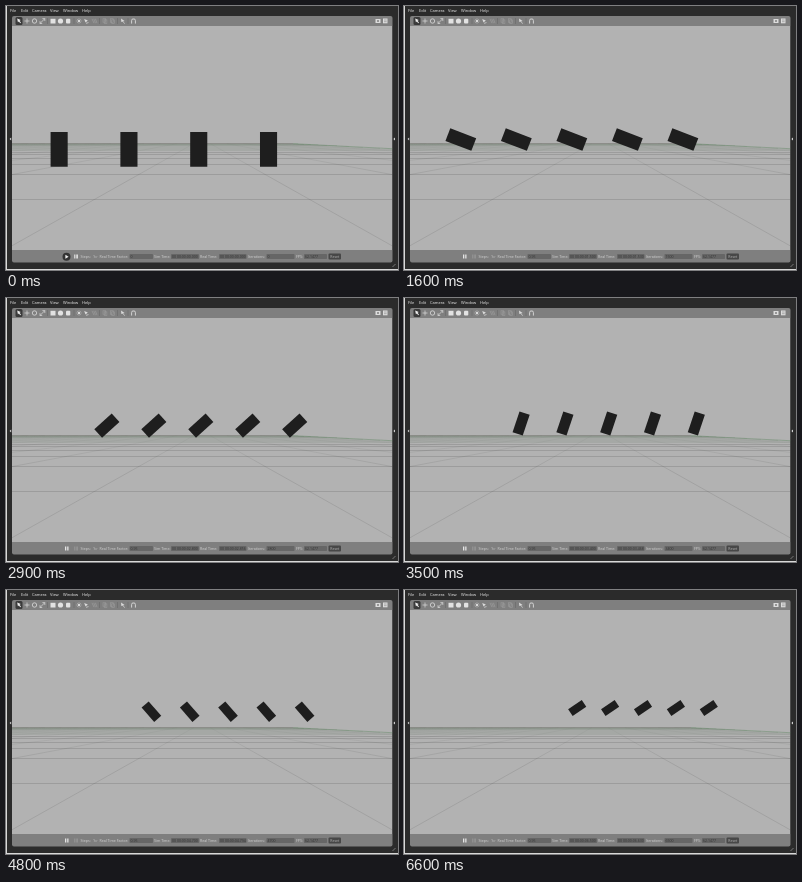
Animation, 392 px wide and 264 px high, one loop 6.7 s. Source, as an HTML page with a canvas:

```html
<!DOCTYPE html>
<html lang="en">
<head>
<meta charset="utf-8">
<title>Tumbling boxes</title>
<style>
html, body { margin: 0; width: 100%; height: 100%; overflow: hidden; background: #2b2b2b; }
canvas { display: block; width: 392px; height: 264px; }
</style>
</head>
<body>
<canvas id="stage" width="392" height="264"></canvas>
<script>
const ctx = document.getElementById('stage').getContext('2d');
const LOOP = 6700, STEP = 100;
const VIEW = { x: 6, y: 20, w: 380.5, h: 224 };
const VP = { x: 196, y: 133 };
const BAR = '#7f7f7f';

// seconds, inverse spacing of the row, angle of the long side in degrees
const KEYS = [
  [0, 1 / 69.8, 90], [0.13, 1 / 69.8, 90], [0.9, 1 / 61.5, 55], [2.3, 1 / 50.6, -13],
  [3.5, 1 / 43.8, -71.5], [4.8, 1 / 38.3, -131], [5.8, 1 / 35, -178], [6.6, 1 / 32.9, -214]
];

function rect(x, y, w, h, color, radius = 0) {
  ctx.fillStyle = color;
  ctx.beginPath();
  ctx.roundRect(x, y, w, h, radius);
  ctx.fill();
}

function path(points, color, width = 0.7, fill = false) {
  ctx.beginPath();
  points.forEach(([x, y], i) => i ? ctx.lineTo(x, y) : ctx.moveTo(x, y));
  if (fill) {
    ctx.fillStyle = color;
    ctx.fill();
  } else {
    ctx.strokeStyle = color;
    ctx.lineWidth = width;
    ctx.stroke();
  }
}

function disc(x, y, r, color, hollow = false) {
  ctx.beginPath();
  ctx.arc(x, y, r, 0, Math.PI * 2);
  ctx.fillStyle = ctx.strokeStyle = color;
  ctx.lineWidth = 0.8;
  hollow ? ctx.stroke() : ctx.fill();
}

function text(s, x, y, size, color) {
  ctx.font = size + 'px "Open Sans", "Noto Sans", sans-serif';
  ctx.fillStyle = color;
  ctx.fillText(s, x, y);
}

function pose(t) {
  let i = 1;
  while (i < KEYS.length - 1 && t > KEYS[i][0]) i++;
  const a = KEYS[i - 1], b = KEYS[i], u = (t - a[0]) / (b[0] - a[0]);
  return { gap: 1 / (a[1] + (b[1] - a[1]) * u), angle: (a[2] + (b[2] - a[2]) * u) * Math.PI / 180 };
}

function menu() {
  [['File', 4], ['Edit', 15], ['Camera', 26], ['View', 44], ['Window', 57], ['Help', 76]]
    .forEach(([s, x]) => text(s, x, 5.8, 4, '#f2f2f2'));
}

function toolbar() {
  const light = '#dcdcdc', dim = '#9c9c9c';
  rect(6, 10, 380.5, 10, BAR, [2, 2, 0, 0]);
  rect(9.5, 11, 7, 8, '#3a3a3a', 1.5);
  path([[11.2, 12.4], [14.8, 14], [13.6, 14.8], [15, 16.8], [14.2, 17.3], [12.9, 15.4], [11.9, 16.2]], '#eee', 0, true);
  path([[18.5, 15], [23.5, 15]], light);
  path([[21, 12.5], [21, 17.5]], light);
  disc(28.5, 15, 2.2, light, true);
  path([[34, 17.5], [38.8, 12.6]], light);
  path([[36.4, 12.6], [38.8, 12.6], [38.8, 15]], light);
  path([[34, 15.2], [34, 17.5], [36.2, 17.5]], light);
  rect(44.5, 12.8, 5, 4.7, '#e2e2e2');
  disc(54.5, 15, 2.6, '#e2e2e2');
  rect(60, 12.8, 4.3, 4.7, '#e2e2e2', 1);
  disc(73, 15, 1.2, light);
  for (let i = 0; i < 8; i++) {
    const a = i * Math.PI / 4, c = Math.cos(a), s = Math.sin(a);
    path([[73 + 1.6 * c, 15 + 1.6 * s], [73 + 2.6 * c, 15 + 2.6 * s]], light, 0.5);
  }
  path([[78.2, 13], [81.8, 14.5], [79.5, 16.5]], light, 0, true);
  path([[80, 17.3], [82.5, 16.6]], light);
  for (let i = 0; i < 3; i++) path([[86 + i * 1.7, 12.8], [88 + i * 1.5, 17.2]], dim);
  [41.5, 68, 93.5, 111.5, 122].forEach(x => path([[x, 12], [x, 18]], '#686868', 0.6));
  [97, 104.5].forEach(x => {
    ctx.strokeStyle = dim;
    ctx.lineWidth = 0.6;
    ctx.strokeRect(x, 12.8, 2.7, 3.4);
    ctx.strokeRect(x + 1.2, 13.9, 2.7, 3.4);
  });
  path([[115, 12.6], [118.6, 15], [115.4, 16]], light, 0, true);
  path([[117, 15.5], [118.6, 17.7]], light);
  path([[125.6, 17.6], [125.6, 14.6], [126.3, 13], [128.7, 13], [129.4, 14.6], [129.4, 17.6]], light, 0.9);
  rect(369.5, 13, 5, 4, light);
  disc(372, 15, 1, BAR);
  rect(377, 12.5, 4.5, 4.8, light);
  path([[378, 14], [380.7, 14]], '#777', 0.5);
  path([[378, 15.7], [380.7, 15.7]], '#777', 0.5);
}

function ground() {
  const cell = 3.56, left = -14.5, right = 5.5, rows = 18;
  const depth = n => 1 / (0.0164 + 0.0117 * n);
  const xAt = (k, dy) => VP.x + k * cell * dy;
  const far = depth(rows - 1), near = VIEW.y + VIEW.h - VP.y;

  for (let n = 0; n < rows; n++) {
    const dy = depth(n), y = Math.floor(VP.y + dy) + 0.5;
    const color = n > 5 ? 'rgba(50,80,55,.1)' : 'rgba(50,50,50,.17)';
    path([[Math.max(6, xAt(left, dy)), y], [Math.min(387, xAt(right, dy)), y]], color, 1);
  }

  // spokes thin out where they crowd together
  const fade = ctx.createLinearGradient(0, VP.y + far, 0, VP.y + 40);
  fade.addColorStop(0, 'rgba(50,60,50,.06)');
  fade.addColorStop(1, 'rgba(50,50,50,.22)');
  for (let k = left; k <= right; k++) {
    path([[xAt(k, far), VP.y + far], [xAt(k, near), VP.y + near]], fade, 0.6);
  }
  path([[6, 137.5], [xAt(right, far), 137.5]], 'rgba(80,65,65,.18)', 1);
  path([[xAt(right, far), VP.y + far], [xAt(right, 10), VP.y + 10]], 'rgba(70,125,75,.45)', 0.7);
}

function boxes(t) {
  const { gap, angle } = pose(t);
  const long = gap * 0.5, short = gap * 0.245;
  const lastX = 342.5 - 1.1456 * gap, y = 95.4 + 0.687 * gap;
  for (let i = 0; i < 5; i++) {
    ctx.save();
    ctx.translate(lastX - i * gap, y);
    ctx.rotate(angle);
    rect(-long / 2, -short / 2, long, short, '#1e1e1e');
    ctx.restore();
  }
}

function clock(s) {
  return '00 00:00:' + s.toFixed(3).padStart(6, '0');
}

function status(t) {
  const paused = t < 0.1, run = Math.max(0, t - 0.1), icon = '#e4e4e4';
  const label = (s, x) => text(s, x, 252, 3.6, '#d6d6d6');
  const field = (s, x, w) => {
    rect(x, 248, w, 5, '#666', 0.8);
    text(s, x + 1, 251.8, 3.5, '#333');
  };
  rect(6, 244, 380.5, 12.5, BAR, [0, 0, 2, 2]);
  if (paused) {
    disc(60.5, 250.7, 4, '#333');
    path([[59.4, 248.7], [62.6, 250.7], [59.4, 252.7]], '#eee', 0, true);
  } else {
    rect(59, 248.6, 1.3, 4, icon);
    rect(61.2, 248.6, 1.3, 4, icon);
  }
  const stepColor = paused ? icon : '#959595';
  rect(68.2, 248.6, 1.2, 4, stepColor);
  rect(70.3, 248.6, 1.6, 4, stepColor);
  label('Steps:', 74.5);
  label('1', 87);
  path([[89, 250.3], [90, 251.5], [91, 250.3]], '#d6d6d6', 0.5);
  label('Real Time Factor:', 93.5);
  field(paused ? '0' : '0.95', 123.5, 23.5);
  label('Sim Time:', 148);
  field(clock(run), 165, 28);
  label('Real Time:', 194);
  field(clock(run * 1.02), 213, 27.5);
  label('Iterations:', 242);
  field(String(Math.round(run * 1000)), 260.5, 28);
  label('FPS:', 290);
  field('62.1477', 298, 23);
  rect(322.5, 247.6, 12.5, 6, '#474747', 1);
  text('Reset', 324.3, 251.9, 3.5, '#b8b8b8');
}

function draw(t) {
  rect(0, 0, 392, 264, '#2b2b2b');
  menu();
  toolbar();
  ctx.save();
  ctx.beginPath();
  ctx.rect(VIEW.x, VIEW.y, VIEW.w, VIEW.h);
  ctx.clip();
  rect(VIEW.x, VIEW.y, VIEW.w, VIEW.h, '#b2b2b2');
  ground();
  boxes(t);
  ctx.restore();
  status(t);
  path([[5.2, 131.5], [3.6, 133], [5.2, 134.5]], '#ddd', 0, true);
  path([[389, 131.5], [387.4, 133], [389, 134.5]], '#ddd', 0, true);
  path([[386.5, 261], [389.5, 258]], '#9a9a9a', 0.7);
  // light window edge
  rect(0, 0, 1, 264, '#d8d8d8');
  rect(0, 263, 392, 1, '#d8d8d8');
}

function frame() {
  const ms = performance.now() % LOOP;
  draw(Math.floor(ms / STEP) * STEP / 1000);
  requestAnimationFrame(frame);
}
frame();
</script>
</body>
</html>
```
